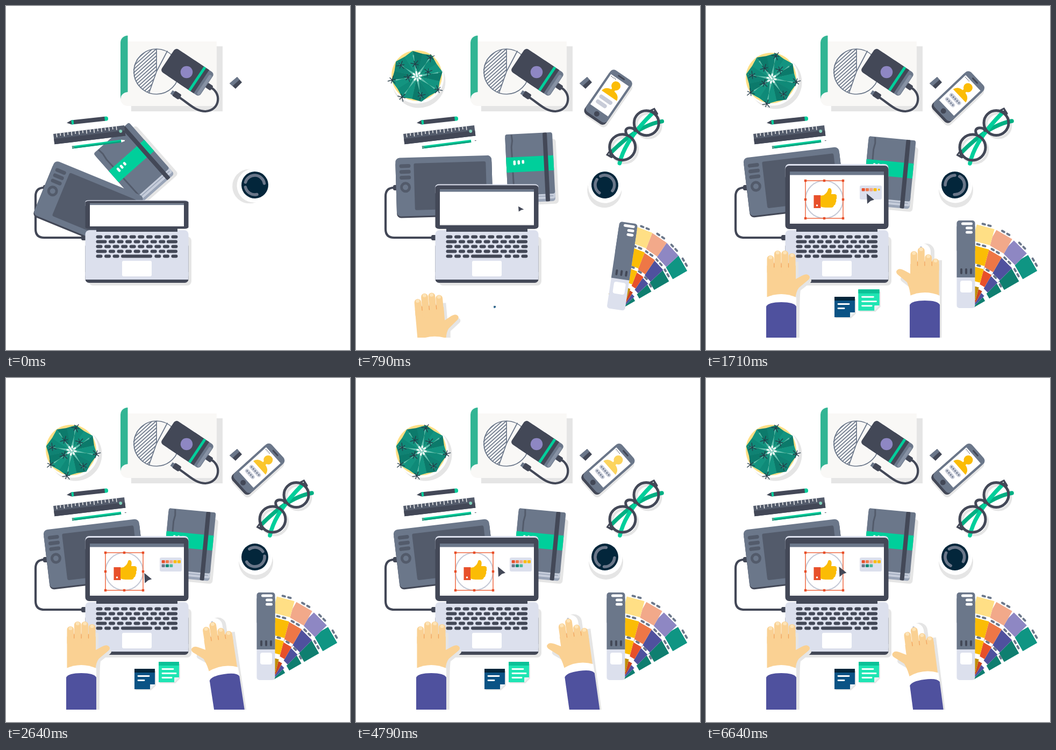
Animation of 640 by 640 pixels, one loop 6.71 s. Source, as an HTML page:

```html
<!DOCTYPE html>
<html lang="en">
<head>
<meta charset="utf-8">
<title>Desk</title>
<style>
html, body { margin: 0; width: 100%; height: 100%; overflow: hidden; background: #fff; }
svg { display: block; width: 100vw; height: 100vh; }
</style>
</head>
<body>
<svg id="stage" viewBox="0 0 640 640"></svg>
<script>
const LOOP = 6710;
const DARK = '#434857', SLATE = '#6b778a', MID = '#535b6b', PALE = '#dce0ed', SHADE = '#e5e5e5',
  GREEN = '#00cf9b', GOLD = '#fbbc05', RED = '#e8502a', VIOLET = '#4f519e', NAVY = '#03263b',
  SKIN = '#fad193', WHITE = '#fff', LILAC = '#8e87c3';

// Markup helpers
const rect = (x, y, w, h, fill, rx = 0) =>
  `<rect x="${x}" y="${y}" width="${w}" height="${h}" fill="${fill}" rx="${rx}"/>`;
const disc = (x, y, r, fill) => `<circle cx="${x}" cy="${y}" r="${r}" fill="${fill}"/>`;
const shape = (d, fill) => `<path d="${d}" fill="${fill}"/>`;
const line = (d, stroke, w, cap = 'round') =>
  `<path d="${d}" fill="none" stroke="${stroke}" stroke-width="${w}" stroke-linecap="${cap}"/>`;
const ring = (x, y, r, stroke, w) =>
  `<circle cx="${x}" cy="${y}" r="${r}" fill="none" stroke="${stroke}" stroke-width="${w}"/>`;
const put = (transform, body) => `<g transform="${transform}">${body}</g>`;
const part = (id, body) => `<g id="${id}">${body}</g>`;
const many = (n, f) => Array.from({ length: n }, (_, i) => f(i)).join('');

function paper() {
  return rect(233, 75, 170, 121, SHADE) + rect(225, 66, 167, 120, '#f9f8f6') +
    shape('M226.5 55A13.5 13 0 0 0 213 68V174H226.5Z', '#32b594') +
    shape('M227 160A14 13 0 0 0 227 186Z', '#f9f8f6') +
    shape('M213 173V160H226A13 13 0 0 0 213 173Z', '#32b594') +
    `<clipPath id="half"><path d="M280 80A42 42 0 0 0 266 162L280 122Z"/></clipPath>` +
    `<g clip-path="url(#half)">${many(18, i => line(`M230 ${92 + i * 6.5}L290 ${38 + i * 6.5}`, SLATE, 1.7))}</g>` +
    ring(280, 122, 42, SLATE, 1.7) + line('M280 80V122L266 162M280 122L300 84', SLATE, 1.7);
}

function drive() {
  return line('M379 151C401 159 400 194 371 196C352 196 340 181 318 167', DARK, 4.2) +
    put('translate(378 150) rotate(34)', rect(-6, -5, 12, 10, DARK, 2)) +
    put('translate(317 166) rotate(33)', rect(-7, -6, 15, 11, DARK, 3) + rect(-11, -4, 5, 8, SLATE)) +
    put('translate(337 123) rotate(33.7)',
      rect(-30, -26, 74, 52, SLATE, 6) + rect(37, -20, 6, 44, '#8792a4', 3) + rect(-43, -26, 60, 52, DARK, 6) +
      rect(0, -26, 32, 52, DARK) + rect(20, -26, 5, 52, GREEN)) +
    disc(336, 123, 11.3, LILAC);
}

function tools() {
  return shape('M416 144L430 132L439 142L427 154Z', DARK) + shape('M416 144L430 132L434.5 137L421.5 149Z', SLATE) +
    put('translate(113 217.5) rotate(-6.2)',
      shape('M0 0L9 -4V4Z', DARK) + rect(66, -4, 11.5, 8, GREEN, 4) + rect(9, -4, 62, 8, DARK) + rect(9, -4, 4, 8, GREEN)) +
    put('translate(88 238) rotate(-6.9)',
      rect(0, 0, 133, 19.5, MID) + rect(0, 9.5, 133, 10, DARK) +
      many(17, i => line(`M${6 + i * 7} 0V${i % 2 ? 5 : 7}`, WHITE, 1.4, 'butt')) + disc(125, 10, 3, '#7ed0b8')) +
    put('translate(123 263) rotate(-7.3)',
      rect(0, -2.5, 92, 5, GREEN) + rect(0, 0, 92, 2.5, '#0a9d7b') + rect(0, -2.5, 4, 5, '#5b9c8c') +
      shape('M92 -2.5L102 0L92 2.5Z', WHITE) + shape('M99 -.8L102.5 0L99 .8Z', DARK));
}

function notebook() {
  return put('translate(303 242) rotate(5.5)',
    rect(6, 12, 88, 121, SHADE, 6) + rect(0, 100, 88, 28, '#9aa5b8', 5) + rect(3, 108, 85, 15, '#c6cddb', 4) +
    line('M3 118H84', '#9aa5b8', 1.5) + rect(0, 0, 88, 114, SLATE, 4) + rect(0, 6, 10, 108, SLATE) +
    line('M12 1L13 12L11 24L12 114', MID, 3, 'butt') + rect(0, 43, 88, 28, GREEN) +
    many(3, i => rect(13 + i * 8, 49, 4.5, 9 - i, WHITE, 2)) + rect(70, 0, 8, 128, DARK, 2));
}

function tablet() {
  return put('translate(69 283) rotate(-6.8)',
    rect(0, 5, 179, 107, DARK, 8) + rect(0, 0, 179, 109, SLATE, 8) + rect(34, 11, 134, 87, MID, 3) +
    many(3, i => rect(7, 12 + i * 10.7, 21, 7, MID, 3.5)) + ring(17.5, 55, 7.5, MID, 5));
}

function lid() {
  const mark = (x, y) => rect(x - 2.2, y - 2.2, 4.4, 4.4, RED);
  const tints = [RED, '#f0784a', '#f2a98c', GOLD, GOLD, SLATE, '#0f8a74', '#4db89a'];
  return rect(147.5, 294, 192, 30, PALE, 7) + rect(147.5, 297, 192, 118, DARK, 7) +
    rect(156, 308, 175, 97, WHITE) + rect(156, 308, 175, 6.5, SLATE) + rect(156, 402.5, 175, 1.2, SHADE) +
    part('circle', ring(0, 0, 35, '#c5c9d6', 2)) +
    part('frame', '<rect x="-35" y="-35" width="70" height="70" fill="none" stroke="#f0714c" stroke-width="1.6"/>' +
      [-35, 0, 35].map(x => [-35, 0, 35].map(y => x || y ? mark(x, y) : '').join('')).join('')) +
    part('thumb', put('translate(-220 -360)', rect(200.5, 352, 13, 24, RED) + disc(206.5, 371, 1.8, WHITE) +
      shape('M213 353L219 352Q226 347 227 341Q228 338 231 339Q235 341 233 350H240Q244 351 243 355Q244 358 242 360Q243 364 241 366Q241 370 238 371Q237 375 233 375H222Q217 375 213 373Z', GOLD))) +
    part('panel', rect(-20.5, -13, 41, 26, PALE, 3)) +
    tints.map((c, i) => part('tint' + i, rect(-3, -2.8, 6, 5.6, c, 1))).join('') +
    part('cursor', shape('M0 0L14 11.5L7.5 13.5L1 19Z', DARK));
}

function laptop() {
  const key = (x, y, w) => rect(x, y, w, 6, DARK, 3);
  const step = 15.55;
  const even = y => many(10, i => key(167.5 + i * step, y, 12));
  const wide = y => key(167.5, y, 20) + many(7, i => key(191 + i * step, y, 12)) + key(299, y, 20);
  return rect(154, 429, 191, 91, SHADE, 8) + rect(147.5, 440, 192, 75, DARK, 7) + rect(147.5, 417, 192, 92, PALE, 8) +
    rect(147.5, 495, 192, 14, PALE) + rect(168, 411, 151, 9, DARK) +
    even(426.5) + wide(435.5) + even(444.5) + wide(453.5) +
    [0, 1, 2, 7, 8, 9].map(i => key(167.5 + i * step, 462.5, 12)).join('') + key(214, 462.5, 58) +
    rect(216, 474, 55, 29, WHITE, 3) + part('lid', lid());
}

function cactus() {
  const polar = (r, deg) => {
    const a = deg * Math.PI / 180;
    return `${(r * Math.cos(a)).toFixed(1)} ${(r * Math.sin(a)).toFixed(1)}`;
  };
  const thorns = [[8, -42], [-36, -6], [-13, -19], [-14, 9], [15, -16], [22, 29], [46, 6], [-39, 26], [-9, 47]];
  const lobes = many(8, i => shape(`M0 0L${polar(48, i * 45 - 80)}L${polar(43, i * 45 - 57)}Z`, i % 2 ? '#0c7a6b' : '#0f8a78') +
    shape(`M0 0L${polar(48, i * 45 - 80)}L${polar(43, i * 45 - 103)}Z`, i % 3 ? '#139480' : '#0f8273'));
  const ribs = many(8, i => shape(`M${polar(3, i * 45 + 10)}L${polar(40, i * 45 - 82)}L${polar(40, i * 45 - 78)}L${polar(3, i * 45 - 170)}Z`, '#62bfac') +
    line(`M0 0L${polar(8, i * 45 - 80)}`, WHITE, 3));
  const spikes = thorns.map(([x, y]) => put(`translate(${x} ${y})`,
    line(many(6, i => `M0 0L${polar(i % 2 ? 8 : 6, i * 60 + x)}`), '#263c48', 1.3))).join('');
  return disc(7, 7, 49.5, SHADE) + disc(1, 1, 49.5, WHITE) + disc(-1, -1, 47, '#ffdf85') + lobes + ribs + spikes;
}

function phone() {
  const bar = (y, w, n) => rect(-15, y, w, 7.5, '#c8ccd8', 3.7) +
    `<g class="code">${many(n, i => disc(-11 + i * 5, y + 3.7, 1.4, SLATE))}</g>`;
  return rect(-20, -43, 48, 97, SHADE, 8) + rect(-24, -44, 48, 95, DARK, 8) + rect(-24, -48, 48, 94, SLATE, 8) +
    rect(-20, -37, 40, 68, WHITE) + rect(-8, -44, 15, 3, DARK, 1.5) + disc(0, 39, 5, DARK) +
    many(4, i => disc(-17 + i * 3, -34, .8, DARK)) +
    part('avatar', disc(0, -24, 8.5, GOLD) + rect(-3.5, -19, 7, 9, GOLD) + shape('M-17 -2Q-15 -14 0 -14Q15 -14 17 -2Z', GOLD)) +
    bar(4, 28, 5) + bar(15, 23, 4);
}

function glasses() {
  return put('translate(-518 -242)',
    ring(544, 222, 23, SHADE, 5) + ring(500, 268, 24, SHADE, 5) +
    line('M474 274Q524 222 569 214', '#00b083', 7.5) + line('M552 198Q500 250 491 293', GREEN, 7.5) +
    ring(540, 217.5, 23, DARK, 5) + ring(496, 263, 24, DARK, 5) + line('M503 238Q499 229 507 227Q517 226 519 232', DARK, 5) +
    line('M548 195L554 192L559 200M474 270L469 277L476 281', DARK, 5) +
    disc(553, 194, 1, WHITE) + disc(471, 276, 1, WHITE));
}

function fan() {
  const cards = [['#ffdf85', GOLD, GOLD, '#c08e08'], ['#f2a98a', '#ee7746', RED, '#c9441f'],
    [LILAC, VIOLET, VIOLET, VIOLET], ['#0f9583', '#0f7f70', '#0f7f70', '#0f7f70']];
  const card = c => rect(-17, -153, 34, 145, WHITE) +
    [[-144, 31], [-105, 32], [-67, 26], [-32, 24]].map(([y, h], i) =>
      rect(-17, y, 34, h, c[i]) + (i < 3 ? rect(-9, y - 6, 8.5, 4, SLATE, 2) + rect(2, y - 6, 8.5, 4, SLATE, 2) : '')).join('');
  const handle = rect(-16.5, -151, 34, 163, PALE, 5) + rect(-16.5, -151, 34, 60, SLATE, 5) + rect(-16.5, -140, 34, 95, SLATE) +
    [[-8, 21], [0, 13], [0, 13]].map(([x, w], i) => rect(x, -147.5 + i * 8, w, 5, WHITE, 2.5)).join('') +
    many(3, i => rect(-10 + i * 9, -62, 4, 11, DARK, 2)) + rect(-10, -39, 22, 22, WHITE, 4);
  return [3, 2, 1, 0].map(i => part('card' + (i + 1), card(cards[i]))).join('') + part('handle', handle);
}

function cup() {
  return disc(2, 10, 32, SHADE) + disc(1, 2, 31.5, WHITE) + disc(0, 0, 25, NAVY);
}

function note(fill, strip, widths) {
  return shape('M-17 -15H21V12L12 21H-17Z', SHADE) + shape('M-19 -19H19V10H10V19H-19Z', fill) +
    shape('M19 10L10 19V12Q10 10 12 10Z', '#e9f2f5') + rect(-19, -19, 38, 7, strip) +
    widths.map((w, i) => line(`M-12 ${-5.5 + i * 8}h${w}`, WHITE, 2.8)).join('');
}

// Finger tops run from the little finger to the index finger; lift raises the thumb
function hand(tops, lift) {
  const palm = `M-26.5 -68V-4H26Q27 -20 33 ${-27 - lift}L51 ${-42 - lift}Q55 ${-47 - lift} 51 ${-50 - lift}` +
    `Q47 ${-54 - lift} 38 ${-49 - lift}L27 ${-43 - lift}V-68Z`;
  return shape(palm, SKIN) +
    tops.map((y, i) => rect(-26.5 + i * 13.4, y, 12.8, -y - 50, SKIN, 6.4) +
      rect(-23.6 + i * 13.4, y + 1, 7, 6, '#fde4b8', 3)).join('') +
    many(3, i => line(`M${-13.3 + i * 13.4} -72V-65`, '#f2a35c', 1.3)) +
    shape('M-28 9V-9Q0 -21 28 -9V9Z', WHITE) + shape('M-28 130V8Q-24 0 0 0Q24 0 28 8V130Z', VIOLET);
}
const handShade = () => shape('M-21 -75H32V-45L52 -46Q59 -41 54 -36L36 -22Q33 -10 34 130H-20Z', SHADE);
const mouse = () => rect(-13, -106, 31, 60, SHADE, 15) + rect(-20, -106, 31, 60, WHITE, 15) + rect(-9, -101, 4, 9, '#c5c9d6', 2);

document.getElementById('stage').innerHTML =
  '<clipPath id="desk"><path d="M0 0H640V617H0Z"/></clipPath><g clip-path="url(#desk)">' +
  paper() + drive() + part('notebook', notebook()) +
  line('M75 338H71Q55 338 55 354V415Q55 431 71 431H148', DARK, 4.2) + rect(69, 333, 10, 10, DARK, 3) + rect(140, 426, 10, 10, DARK, 3) +
  part('tablet', tablet()) + tools() +
  part('cactus', cactus()) + part('phone', phone()) + part('glasses', glasses()) + part('fan', fan()) +
  part('cup', cup()) + part('swirl', line('M-17.5 -5A18 18 0 0 1 17.5 -3', SLATE, 5.5) + line('M-17.6 4A18 18 0 0 0 4 17.5', SLATE, 5.5)) +
  part('blue', note('#0a5385', NAVY, [20, 11])) + part('mint', note('#1fe5b3', '#0cc197', [20, 25, 17])) +
  laptop() +
  part('left', handShade() + hand([-87, -96, -96, -91], 0)) +
  part('right', mouse() + put('translate(11 0) scale(-1 1)', handShade()) + put('scale(-1 1)', hand([-78, -86, -99, -92], 7))) +
  '</g>';

// Motion helpers
const parts = {};
document.querySelectorAll('g[id]').forEach(g => parts[g.id] = g);
const codes = document.querySelectorAll('.code');
const move = (id, transform) => parts[id].setAttribute('transform', transform);
const pose = (id, x, y, turn = 0, size = 1) =>
  move(id, `translate(${x} ${y}) rotate(${turn}) scale(${size})`);
const span = (t, start, length) => Math.min(1, Math.max(0, (t - start) / length));
const easeOut = p => 1 - (1 - p) ** 3;
const easeSine = p => (1 - Math.cos(Math.PI * p)) / 2;
const pop = (t, start, length) => {
  const p = span(t, start, length) - 1;
  return p === -1 ? 0 : 1 + 2.2 * p ** 3 + 1.2 * p ** 2;
};
function track(t, keys) {
  const i = keys.findIndex(k => k[0] > t);
  if (i === 0) return keys[0].slice(1);
  if (i < 0) return keys[keys.length - 1].slice(1);
  const a = keys[i - 1], b = keys[i], p = (t - a[0]) / (b[0] - a[0]);
  return a.slice(1).map((v, j) => v + (b[j + 1] - v) * p);
}

const leftPath = [[350, 144, 735, -9], [560, 143, 681, -7], [790, 142, 630, -5], [1050, 142, 586, -3],
  [1350, 141, 559, -1], [1710, 140, 551, 0], [2150, 140, 549, 0]];
const rightPath = [[850, 407, 730, 6], [1150, 407, 632, 4], [1420, 407, 568, 2], [1710, 407, 548, 0], [2200, 412, 547, -2],
  [2860, 402, 553, -12], [3570, 408, 550, -11], [3900, 401, 554, -13], [4290, 406, 550, -10],
  [4790, 415, 545, -8], [5640, 421, 542, -4], [6430, 410, 556, -7], [6640, 406, 561, -7.5]];
const cursorPath = [[790, 302, 354], [1710, 299, 349], [2200, 292, 348], [2860, 240, 370], [3570, 249, 366], [3900, 237, 369],
  [4290, 244, 362], [4790, 264, 351], [5640, 280.5, 341], [6430, 257, 348], [6640, 247.5, 351]];
const phoneTurn = [[250, -30], [500, 10], [790, 34.5], [1200, 41], [1710, 46.5], [2300, 47.7], [4800, 48.5]];

function draw(t) {
  const rest = 1 - easeOut(span(t, 0, 1800));
  move('tablet', `rotate(${29.2 * rest} 73 328)`);
  move('notebook', `rotate(${-47 * rest} 270.5 420)`);
  pose('cup', 463, 333, 88 * rest);
  pose('swirl', 463, 333, t * .06);
  pose('cactus', 122 - 48 * rest, 135 - 24 * rest, 142 * rest, easeOut(span(t, 60, 620)));
  pose('phone', 470, 168.5, track(t, phoneTurn)[0], easeOut(span(t, 250, 500)));
  pose('glasses', 518, 242, -40 * (1 - easeOut(span(t, 200, 560))) + 4 * rest, easeOut(span(t, 200, 500)));
  pose('fan', 483, 550, 0, easeOut(span(t, 70, 380)));
  const fold = rest * .8;
  move('handle', `rotate(${60 * fold} -16.5 12)`);
  for (let i = 1; i < 5; i++) move('card' + i, `rotate(${15 * i + (60 - 15 * i) * fold})`);

  move('lid', `translate(0 414) scale(1 ${.44 + .56 * easeSine(span(t, 180, 1320))}) translate(0 -414)`);
  pose('circle', 220, 360, 0, pop(t, 900, 420));
  pose('frame', 220, 360, 0, pop(t, 1080, 420));
  pose('thumb', 220, 360, 0, pop(t, 1250, 420));
  pose('panel', 306.5, 347, 0, pop(t, 1250, 360));
  for (let i = 0; i < 8; i++)
    pose('tint' + i, 292.7 + i % 5 * 7.3, i < 5 ? 341.7 : 349.2, 0, pop(t, 1430 + 60 * i, 240));
  const [cx, cy] = track(t, cursorPath);
  pose('cursor', cx, cy, 0, .74 * easeOut(span(t, 560, 230)) + .26 * span(t, 790, 400));

  pose('blue', 258, 560, 0, pop(t, 778, 560));
  pose('mint', 303, 547, 0, pop(t, 1120, 760));
  codes.forEach(c => c.setAttribute('opacity', span(t, 1150, 350)));
  const beat = (1 - Math.cos((t - 3600) / 1200 * 2 * Math.PI)) / 2;
  parts.avatar.setAttribute('opacity', t < 1750 ? 1 : .64 + .36 * Math.min(1, beat * 1.6));

  pose('left', ...track(t, leftPath));
  pose('right', ...track(t, rightPath));
}

const begin = performance.now();
function tick() {
  draw((performance.now() - begin) % LOOP);
  requestAnimationFrame(tick);
}
draw(0);
requestAnimationFrame(tick);
</script>
</body>
</html>
```
